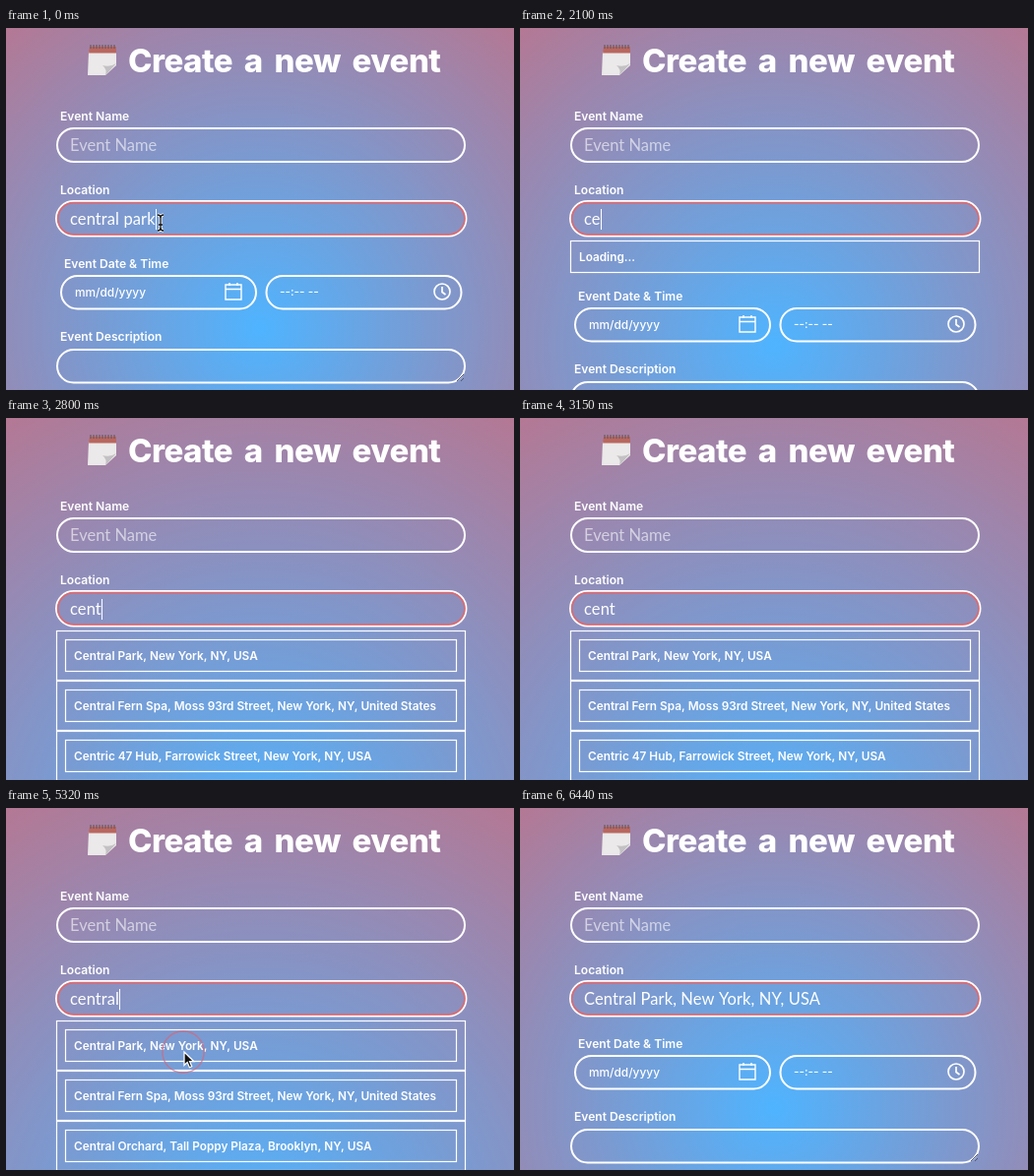
An HTML page with a canvas that plays this animation: 516 by 368 pixels, repeating every 6.51 s.

```html
<!DOCTYPE html>
<html lang="en">
<head>
<meta charset="utf-8">
<title>Create a new event</title>
<style>
  html, body { margin: 0; width: 100%; height: 100%; overflow: hidden; }
  canvas { display: block; }
</style>
</head>
<body>
<canvas id="stage" width="516" height="368"></canvas>
<script>
const ctx = document.getElementById('stage').getContext('2d');
const W = 516, H = 368, LOOP = 6510, BLINK = 480;
const WHITE = '#fff', RED = '#de6a70', HINT = 'rgba(255,255,255,.6)';
const TITLE = '800 33px Inter, sans-serif';
const LABEL = '600 12.1px Inter, sans-serif';
const SMALL = '500 11.9px Inter, sans-serif';
const ITEM = '600 11.8px Inter, sans-serif';
const FIELD = '400 16.5px Lato, sans-serif';

// Value of the location field from each time on
const typed = [
  [0, 'central park'], [70, ''], [1750, 'c'], [1960, 'ce'], [2240, 'cen'],
  [2520, 'cent'], [3430, 'centr'], [3640, 'centra'], [3990, 'central'],
  [5670, 'Central Park, New York, NY, USA']
];
const OPEN = 2100, RESULTS = 2240, LOADED = 2730, REFINED = 3710, CLOSE = 5670;
const places = [
  'Central Park, New York, NY, USA',
  'Central Fern Spa, Moss 93rd Street, New York, NY, United States',
  'Centric 47 Hub, Farrowick Street, New York, NY, USA'
];
const refinedPlace = 'Central Orchard, Tall Poppy Plaza, Brooklyn, NY, USA';
const ROW = 51, LOADING = 33, ROWS = 5, TOP = 216;

function text(str, x, y, font, color = WHITE, spacing = 0, wordGap = 0) {
  ctx.font = font;
  ctx.letterSpacing = spacing + 'px';
  ctx.wordSpacing = wordGap + 'px';
  ctx.fillStyle = color;
  ctx.fillText(str, x, y);
  return ctx.measureText(str).width;
}

function pill(x, y, w, h, color = WHITE, line = 2) {
  ctx.strokeStyle = color;
  ctx.lineWidth = line;
  ctx.beginPath();
  ctx.roundRect(x, y, w, h, h / 2);
  ctx.stroke();
}

function box(x, y, w, h) {
  ctx.strokeStyle = WHITE;
  ctx.lineWidth = 1.2;
  ctx.strokeRect(x + .5, y + .5, w, h);
}

function path(d, stroke, line, fill) {
  const p = new Path2D(d);
  if (fill) { ctx.fillStyle = fill; ctx.fill(p); }
  if (stroke) { ctx.strokeStyle = stroke; ctx.lineWidth = line; ctx.stroke(p); }
}

function background(grow) {
  const cy = (610 + grow) / 2;
  const g = ctx.createRadialGradient(W / 2, cy, 0, W / 2, cy, Math.hypot(W / 2, cy));
  g.addColorStop(0, 'rgb(79,180,255)');
  g.addColorStop(1, 'rgb(180,120,148)');
  ctx.fillStyle = g;
  ctx.fillRect(0, 0, W, H);
}

function heading() {
  path('M84 24H112V38L101 48H83Z', null, 0, '#ebe9e9');
  path('M112 36L101 48Q103 42 98 38Q106 40 112 36Z', null, 0, '#c3c1c3');
  path('M85 19H112V25.5H84Z', null, 0, '#b9675f');
  for (let x = 86; x < 112; x += 3) path(`M${x} 17V21`, '#6a5a60', 1.2);
  text('Create a new event', 124, 44.5, TITLE, WHITE, -.5, 5);
}

function lowerForm(dy) {
  ctx.save();
  ctx.translate(0, dy);
  text('Event Date & Time', 59, 244, LABEL);
  pill(56, 252, 198, 33.5);
  text('mm/dd/yyyy', 70, 273, SMALL);
  path('M223 261H239V276H223ZM223 265.5H239M227 259V262M235 259V262', WHITE, 1.4);
  pill(264.5, 252, 198, 33.5);
  text('--:-- --', 278, 272, SMALL);
  path('M451 268A8 8 0 1 1 435 268A8 8 0 1 1 451 268M443 263V268.5L446.5 271', WHITE, 1.7);
  text('Event Description', 55, 318, LABEL);
  pill(52, 327, 414, 33.5);
  path('M458 359L465 352M462 359L465 356', '#555a70', 1);
  ctx.restore();
}

function locationField(t) {
  const [since, value] = typed.findLast(e => e[0] <= t);
  text('Location', 55, 169, LABEL);
  pill(51, 176, 416.5, 35.5);
  pill(52.6, 177.6, 413.3, 32.3, RED, 1.6);
  if (!value) text('Enter location...', 65, 200, FIELD, HINT);
  const width = text(value, 65, 200, FIELD, WHITE, .1);
  if (Math.floor((t - since) / BLINK) % 2 === 0) {
    ctx.fillStyle = WHITE;
    ctx.fillRect(Math.round(65 + width), 184, 1, 21);
  }
}

function dropdown(t) {
  let y = TOP;
  if (t < LOADED) {
    box(51, y, 415, LOADING - 1);
    text('Loading...', 60, y + 20.8, ITEM);
    y += LOADING;
  }
  if (t < RESULTS) return;
  for (let i = 0; i < 3; i++, y += ROW) {
    const place = i === 2 && t >= REFINED ? refinedPlace : places[i];
    box(51, y, 415, ROW - 1);
    box(60, y + 9, 397, 32);
    text(place, 69, y + 29.5, ITEM);
  }
}

function beam(x, y) {
  const d = `M${x - 3} ${y - 8}Q${x} ${y - 8} ${x} ${y - 5}Q${x} ${y - 8} ${x + 3} ${y - 8}`
    + `M${x} ${y - 5}V${y + 5}M${x - 3} ${y + 8}Q${x} ${y + 8} ${x} ${y + 5}`
    + `Q${x} ${y + 8} ${x + 3} ${y + 8}M${x - 2} ${y + 2}H${x + 2}`;
  path(d, WHITE, 3);
  path(d, '#111', 1.3);
}

function arrow(x, y) {
  ctx.save();
  ctx.translate(x, y);
  ctx.scale(.9, .9);
  path('M0 0V15L3.5 11.8L6 17.5L8.6 16.4L6.2 10.8H11Z', WHITE, 1.4, '#111');
  ctx.restore();
}

function pointer(t) {
  if (t < 70) return beam(157, 198);
  if (t < 5040 || t >= 6020) return;
  const k = Math.min(1, (t - 5040) / 210);
  const ease = k * k * (3 - 2 * k);
  const x = 157 + 24 * ease, y = 198 + 50 * ease;
  const click = (t - 5250) / 210;
  if (click >= 0 && click < 1) {
    ctx.globalAlpha = 1 - click;
    ctx.strokeStyle = '#d2687c';
    ctx.lineWidth = 1.6;
    ctx.beginPath();
    ctx.arc(180, 248, 13 + 11.5 * (1 - (1 - click) ** 3), 0, 7);
    ctx.stroke();
    ctx.globalAlpha = 1;
  }
  y < 213 ? beam(x, y) : arrow(x, y);
}

function draw(now) {
  const t = now % LOOP;
  const open = t >= OPEN && t < CLOSE;
  const grow = !open ? 0
    : (t < LOADED ? LOADING : 0) + (t >= RESULTS ? ROWS * ROW : 0);
  background(grow);
  heading();
  text('Event Name', 55, 94, LABEL);
  pill(52, 102, 414, 34);
  text('Event Name', 65, 125, FIELD, HINT);
  locationField(t);
  lowerForm(grow);
  if (open) dropdown(t);
  pointer(t);
}

const start = performance.now();
(function tick() {
  draw(performance.now() - start);
  requestAnimationFrame(tick);
})();
</script>
</body>
</html>
```
